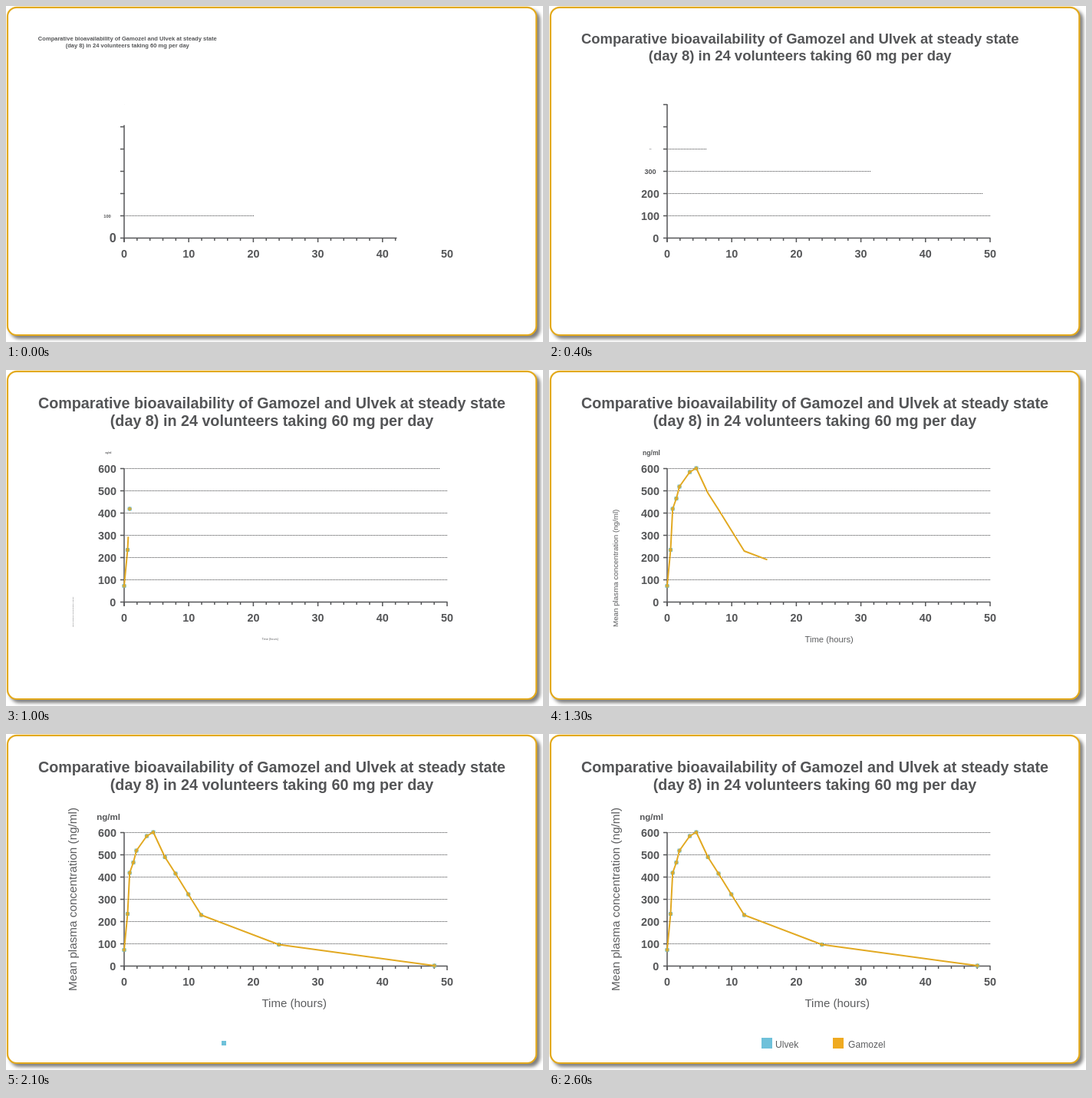
Animation, 700 px wide and 438 px high, one loop 2.7 s. Source, as an HTML page:

```html
<!DOCTYPE html>
<html lang="en">
<head>
<meta charset="utf-8">
<title>Bioavailability chart</title>
<style>
html, body { margin: 0; width: 100%; height: 100%; overflow: hidden; background: #fff; }
svg { display: block; width: 700px; height: 438px; font-family: "Liberation Sans", Arial, sans-serif; }
.card { fill: #fff; stroke: #e3a91c; stroke-width: 2.2; filter: drop-shadow(4px 4px 2px rgba(0, 0, 0, .5)); }
.bold { font-weight: 700; fill: #545557; }
.plain { fill: #5c5d5f; }
.axis { stroke: #545557; stroke-width: 1.5; }
.grid { stroke: #444547; stroke-width: 1.2; stroke-dasharray: 1 1; }
.curve { fill: none; stroke: #e2a922; stroke-width: 2; stroke-linejoin: round; }
</style>
</head>
<body>
<svg id="stage" viewBox="0 0 700 438"></svg>
<script>
const LOOP = 2700, STEP = 100;
const SHORT = 464, LONG = 1040;
const X0 = 154, Y0 = 302.5, UNIT = 8.42, ROW = 29, WIDTH = 421;
const BLUE = '#6fc1da', GOLD = '#efaa21';
const stage = document.getElementById('stage');
const updates = [];

function add(tag, attrs, parent = stage, label) {
  const el = document.createElementNS('http://www.w3.org/2000/svg', tag);
  for (const key in attrs) el.setAttribute(key, attrs[key]);
  if (label !== undefined) el.textContent = label;
  parent.appendChild(el);
  return el;
}

function text(label, x, y, size, cls, anchor, parent) {
  return add('text', { x, y, 'font-size': size, class: cls, 'text-anchor': anchor }, parent, label);
}

function line(x1, y1, x2, y2, cls) {
  return add('line', { x1, y1, x2, y2, class: cls });
}

function ease(t, start, span) {
  const x = Math.min(1, Math.max(0, (t - start) / span));
  return x < .5 ? 2 * x * x : 1 - 2 * (1 - x) * (1 - x);
}

// A group that scales up around its own origin.
function zoom(x, y, scaleAt, turn = 0) {
  const g = add('g', {});
  updates.push(t => {
    const s = scaleAt(t);
    g.setAttribute('visibility', s > 0 ? 'visible' : 'hidden');
    g.setAttribute('transform', `translate(${x} ${y}) rotate(${turn}) scale(${s})`);
  });
  return g;
}

const grow = (start, span) => t => ease(t, start, span);
const showFrom = (el, when) =>
  updates.push(t => el.setAttribute('visibility', when(t) ? 'visible' : 'hidden'));

add('rect', { x: 2, y: 1.8, width: 689.3, height: 427.2, rx: 12, class: 'card' });

// Title
const title = zoom(41.5, 42, grow(-455, LONG));
text('Comparative bioavailability of Gamozel and Ulvek at steady state', 305, 7.5, 19.75, 'bold', 'middle', title);
text('(day 8) in 24 volunteers taking 60 mg per day', 305, 31, 19.75, 'bold', 'middle', title);

// Rows: dotted line and label grow together
const rowStarts = [0, -208, -15, 135, 285, 435, 585];
rowStarts.forEach((start, i) => {
  const y = Y0 - i * ROW;
  const scale = i ? grow(start, SHORT) : t => t < STEP ? 1.12 : 1;
  const label = zoom(i ? 132 : 139.2, y, scale);
  text(i * 100, 0, 5.2, 14.4, 'bold', 'middle', label);
  if (!i) return;
  const dots = line(X0, y, X0, y, 'grid');
  updates.push(t => dots.setAttribute('x2', X0 + WIDTH * scale(t)));
});

// Axes with ticks revealed as they extend
const axisAt = grow(-334, SHORT);
const xAxis = line(X0 - 5, Y0, X0, Y0, 'axis');
const yAxis = line(X0, Y0 + 5, X0, Y0, 'axis');
updates.push(t => {
  xAxis.setAttribute('x2', X0 + WIDTH * axisAt(t) + .5);
  yAxis.setAttribute('y2', Y0 - 6 * ROW * axisAt(t) - .5);
});
for (let h = 0; h <= 50; h += 2) {
  const x = X0 + h * UNIT, major = h % 10 === 0;
  showFrom(line(x, Y0, x, Y0 + (major ? 5.5 : 3.5), 'axis'), t => axisAt(t) >= h / 50 - .01);
  if (major) text(h, x, 327.8, 14.4, 'bold', 'middle');
}
for (let i = 1; i <= 6; i++) {
  const y = Y0 - i * ROW;
  showFrom(line(X0 - 5, y, X0, y, 'axis'), t => axisAt(t) >= i / 6 - .01);
}

// Axis captions
text('ng/ml', 0, 3.5, 11.5, 'bold', 'middle', zoom(133.5, 108.5, grow(628, LONG)));
text('Mean plasma concentration (ng/ml)', 0, 5, 15.25, 'plain', 'start', zoom(87, 335, grow(700, LONG), -90));
text('Time (hours)', 0, 5, 15, 'plain', 'start', zoom(333.5, 351, grow(628, LONG)));

// Curve and its markers
const points = [
  [154, 281.5], [158.5, 234.5], [161.2, 181], [166, 167.5], [170, 152], [183.5, 133], [192, 128],
  [207.2, 160.5], [221, 182], [237.7, 209], [254.5, 236], [355.7, 274.5], [558.5, 302]
];
points.forEach(([x, y], i) => {
  const mark = add('g', { transform: `translate(${x} ${y})` });
  add('rect', { x: -2.5, y: -2.5, width: 5, height: 5, fill: BLUE }, mark);
  add('path', { d: 'M0-3L3 0L0 3L-3 0Z', fill: '#c9ae4a' }, mark);
  showFrom(mark, t => t >= 780 + 80 * i);
});
const curve = add('path', { d: 'M' + points.join('L'), pathLength: 1, class: 'curve' });
const curveAt = grow(757, 1050);
updates.push(t => {
  const p = curveAt(t);
  curve.setAttribute('visibility', p ? 'visible' : 'hidden');
  curve.setAttribute('stroke-dasharray', p < 1 ? `${p} 2` : 'none');
});

// Legend
function swatch(x, color, start) {
  add('rect', { x: -7, y: -7, width: 14, height: 14, fill: color }, zoom(x, 403, grow(start, SHORT)));
}
function caption(label, x, start) {
  text(label, 0, 4.5, 12.1, 'plain', 'start', zoom(x, 404, grow(start, SHORT)));
}
swatch(284, BLUE, 1885);
caption('Ulvek', 295, 2080);
swatch(377, GOLD, 2105);
caption('Gamozel', 390, 2136);

const origin = performance.now();
function draw(now) {
  const t = Math.max(0, now - origin) % LOOP;
  const held = Math.floor(t / STEP) * STEP;
  updates.forEach(update => update(held));
  requestAnimationFrame(draw);
}
draw(origin);
</script>
</body>
</html>
```
